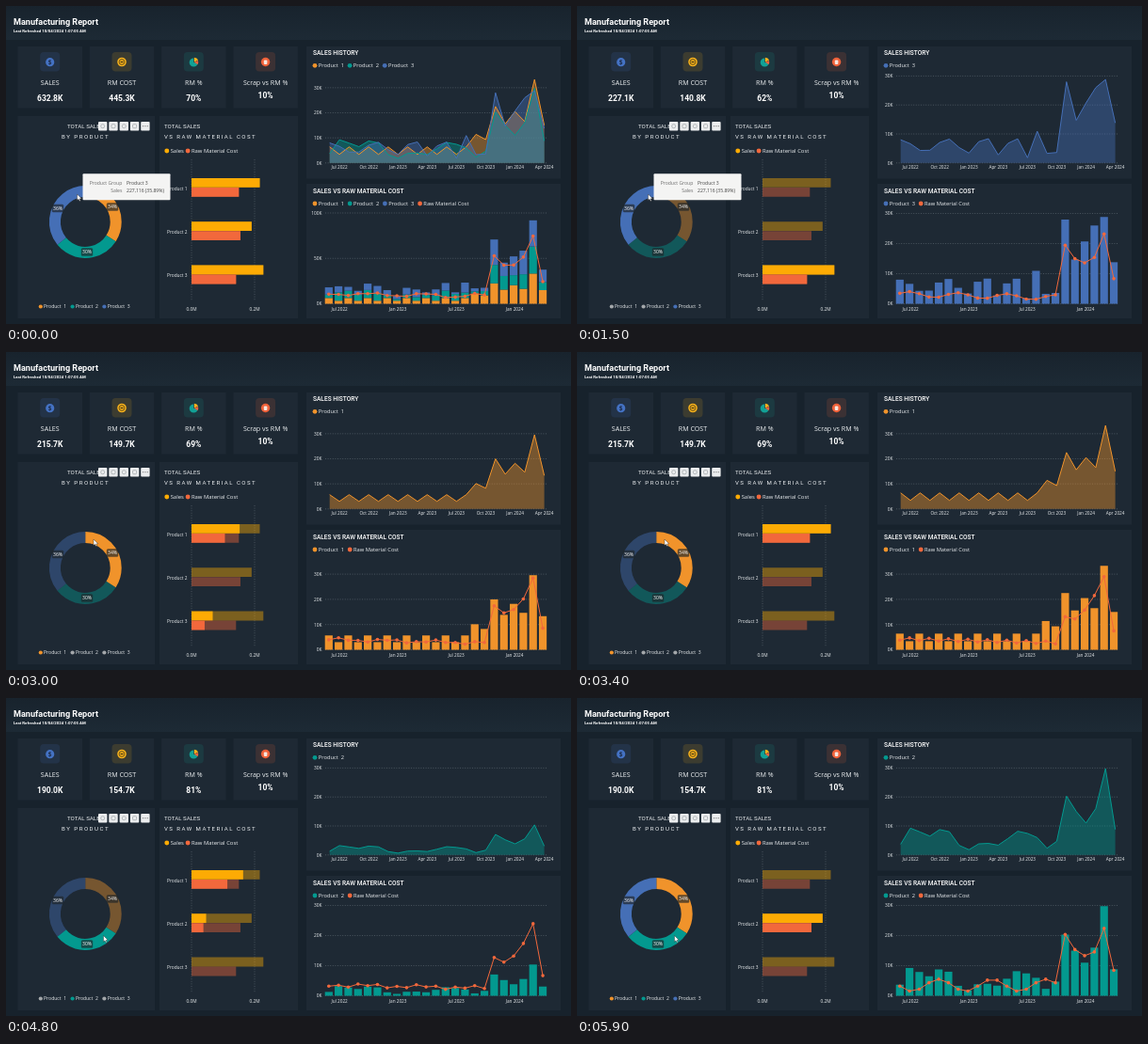
Write an HTML page with a canvas that moves like this. It is 600x338 px and loops after 6 s.

```html
<!DOCTYPE html>
<html lang="en">
<head>
<meta charset="utf-8">
<title>Manufacturing Report</title>
<style>
html, body { margin: 0; width: 100%; height: 100%; overflow: hidden; background: #17222c; }
canvas { display: block; }
</style>
</head>
<body>
<canvas id="stage" width="600" height="338"></canvas>
<script>
const ctx = document.getElementById('stage').getContext('2d');
const LOOP = 6000, MONTH_COUNT = 23;
const SANS = '"Open Sans", sans-serif', DIN = 'Roboto, sans-serif';
const YELLOW = '#fdab04', RED = '#f2683c', GREY = '#a3a7aa', LIGHT = '#eceff1', PANEL = '#1e2934';
const MONTHS = ['Jul 2022', 'Oct 2022', 'Jan 2023', 'Apr 2023', 'Jul 2023', 'Oct 2023', 'Jan 2024', 'Apr 2024'];

const wave = turns => Math.cos(turns * 2 * Math.PI);
const mix = (a, b, p) => a + (b - a) * p;
const ease = p => { p = Math.min(1, Math.max(0, p)); return p * p * (3 - 2 * p); };

// Monthly values in thousands: a wavy quiet period, then a late surge
function series(quiet, surge) {
  const start = MONTH_COUNT - surge.length;
  return Array.from({ length: MONTH_COUNT }, (_, i) => i < start ? Math.max(.3, quiet(i)) : surge[i - start]);
}
const costSurge = lean => [17.7, 14.2, 14.2, 17.1, 24.8, 8.1].map((v, j) => v * (1 - lean * Math.cos(j)));

const PRODUCTS = [
  {
    color: '#f0932b', totals: [215.7, 149.7],
    sales: series(i => 4.9 + 1.5 * wave(i / 2), [11.4, 9.3, 22.5, 15.6, 20.5, 16.5, 33.3, 15]),
    cost: series(i => 4.3 - .09 * i - .5 * wave(i / 2), costSurge(.26))
  },
  {
    color: '#03998f', totals: [190, 154.7],
    sales: series(i => 5.3 + 4 * Math.exp(-i / 20) * wave((i - 3) / 10) + 3 * Math.exp(-i / 12) * wave((i - 1) / 3.7),
      [2.3, 4.7, 20.3, 15, 11, 16, 29.8, 8.8]),
    cost: series(i => 3.5 + 2 * wave((i - 4) / 5.5), costSurge(-.15))
  },
  {
    color: '#456fb6', totals: [227.1, 140.8],
    sales: series(i => 6 + (2 + .015 * i * i) * wave(i / 5 + 1.2 * (i / 14) ** 3),
      [3.3, 3.6, 28, 14.7, 20.7, 26, 28.8, 13.8]),
    cost: series(i => 3.2 - .07 * i + .9 * wave((i - 1) / 5), costSurge(-.1))
  }
];
PRODUCTS.forEach((product, i) => product.name = 'Product  ' + (i + 1));

// What each selection shows; scales are pixels per thousand
const ALL = { shown: PRODUCTS, kpi: ['632.8K', '445.3K', '70%', '10%'], area: 2.665, col: .965, ticks: [0, 50, 100] };
const TENS = [0, 10, 20, 30];
const [VIEW1, VIEW2, VIEW3] = [
  { kpi: ['215.7K', '149.7K', '69%', '10%'], area: 2.665, col: 2.68 },
  { kpi: ['190.0K', '154.7K', '81%', '10%'], area: 3.08, col: 3.2 },
  { kpi: ['227.1K', '140.8K', '62%', '10%'], area: 3.08, col: 3.2 }
].map((view, i) => ({ ...view, shown: [PRODUCTS[i]], ticks: TENS }));
const CLICKS = [[-9999, ALL], [200, VIEW3], [2600, VIEW1], [4550, VIEW2], [5850, ALL]];
const REPORT_DELAY = 100;
const CURSOR = [[0, 75.5, 200], [1500, 75.5, 200], [2200, 93, 199], [3600, 93, 199], [4400, 103.5, 252.5], [LOOP, 103.5, 252.5]];

const has = (view, product) => view.shown.includes(product);

function rect(x, y, w, h, color, radius = 0) {
  ctx.fillStyle = color;
  ctx.beginPath();
  ctx.roundRect(x, y, w, h, radius);
  ctx.fill();
}
function dot(x, y, r, color) {
  ctx.fillStyle = color;
  ctx.beginPath();
  ctx.arc(x, y, r, 0, 7);
  ctx.fill();
}
function slice(x, y, r, from, to, color) {
  ctx.fillStyle = color;
  ctx.beginPath();
  ctx.moveTo(x, y);
  ctx.arc(x, y, r, from, to);
  ctx.fill();
}
function text(str, x, y, size, { align = 'left', color = LIGHT, font = SANS, weight = 400, gap = 0 } = {}) {
  ctx.font = `${weight} ${size}px ${font}`;
  ctx.textAlign = align;
  ctx.letterSpacing = gap + 'px';
  ctx.fillStyle = color;
  ctx.fillText(str, x, y);
}
function path(points) {
  ctx.beginPath();
  points.forEach(([x, y]) => ctx.lineTo(x, y));
}
function stroke(color, width) {
  ctx.strokeStyle = color;
  ctx.lineWidth = width;
  ctx.stroke();
}
function gridLine(x1, y1, x2, y2) {
  ctx.setLineDash([1, 1.6]);
  path([[x1, y1], [x2, y2]]);
  stroke('#66717a', .6);
  ctx.setLineDash([]);
}
function faded(alpha, draw) {
  ctx.globalAlpha = alpha;
  draw();
  ctx.globalAlpha = 1;
}
function legend(items, x, y, pitch, size) {
  items.forEach(([name, color], i) => {
    dot(x + i * pitch, y, size * .42, color);
    text(name, x + i * pitch + size * .65, y + size * .36, size);
  });
}
const productItems = view => view.shown.map(({ name, color }) => [name, color]);

function drawFrame() {
  const header = ctx.createLinearGradient(0, 0, 0, 36);
  header.addColorStop(0, '#18232d');
  header.addColorStop(1, '#1d2a35');
  rect(0, 0, 600, 338, '#17222c');
  rect(0, 0, 600, 36, header);
  text('Manufacturing Report', 8, 19.8, 9.1, { font: DIN, weight: 700, color: '#fff' });
  text('Last Refreshed 10/04/2024 1:07:05 AM', 8, 28.3, 4.3, { font: DIN, weight: 700, color: '#fff' });
  [[12.5, 117, 145.5, 215], [163, 117, 147, 215], [319, 43, 270, 140.5], [319, 189, 270, 143]]
    .forEach(box => rect(...box, PANEL));
}

const CARDS = [
  ['SALES', '#4472c4', x => {
    dot(x, 59.7, 4.6, '#4472c4');
    text('$', x, 62.2, 6.5, { align: 'center', weight: 700, color: '#1b2b49' });
  }],
  ['RM COST', '#f7b21c', x => {
    dot(x, 59.5, 4.8, '#f7b21c');
    ctx.beginPath();
    ctx.arc(x, 59.5, 2.9, 0, 7);
    stroke('#4a3a14', .8);
    rect(x - 1.5, 58.8, 3, 1.4, '#4a3a14');
  }],
  ['RM %', '#12a196', x => {
    slice(x, 60, 4.6, 0, 4.71, '#12a196');
    slice(x + .6, 59.4, 4.6, -1.57, -.4, '#f7b21c');
    slice(x + .6, 59.7, 4.4, -.4, .6, '#e8623c');
  }],
  ['Scrap vs RM %', '#f0623a', x => {
    dot(x, 59.5, 4.7, '#f0623a');
    rect(x - 1.8, 57.5, 3.6, 4.4, '#f6e6df', 1);
  }]
];
function drawCards(view) {
  CARDS.forEach(([label, color, icon], i) => {
    const left = 12.5 + i * 76.3, x = left + 34.2;
    rect(left, 43, 68.5, 65.5, PANEL);
    faded(.14, () => rect(x - 10.5, 49, 21, 20.5, color, 4));
    icon(x);
    text(label, x, 83.7, 7.1, { align: 'center' });
    text(view.kpi[i], x, i < 3 ? 100.6 : 98, 8.5, { align: 'center', font: DIN, weight: 700, color: '#fff' });
  });
}

function drawDonut(view) {
  text('TOTAL SALES', 65, 130, 6.2, { font: DIN });
  text('BY PRODUCT', 59, 141, 6.1, { font: DIN, gap: 1.5 });
  for (let i = 0; i < 5; i++) {
    const x = 98 + i * 11.3;
    rect(x, 123, 9.4, 9.4, '#eceeef', 1);
    if (i === 4) [2.4, 4.7, 7].forEach(d => dot(x + d, 127.7, .6, '#777'));
    else {
      ctx.beginPath();
      ctx.roundRect(x + 2.7, 125.7, 4, 4, i % 2 ? 1 : 2);
      stroke('#9a9fa3', .7);
    }
  }
  const total = PRODUCTS.reduce((sum, p) => sum + p.totals[0], 0);
  let angle = -Math.PI / 2;
  PRODUCTS.forEach(p => {
    const end = angle + p.totals[0] / total * Math.PI * 2;
    faded(has(view, p) ? 1 : .42, () => {
      ctx.beginPath();
      ctx.arc(84.3, 229.5, 32.4, angle, end);
      stroke(p.color, 12);
    });
    angle = end;
  });
  [['34%', 113, 213.5], ['30%', 86, 261.5], ['36%', 55, 215]].forEach(([label, x, y]) => {
    rect(x - 6.2, y - 4.3, 12.4, 8.6, 'rgba(32,38,42,.68)', 1.5);
    text(label, x, y + 1.9, 5.1, { align: 'center', color: '#fff' });
  });
  legend(PRODUCTS.map(p => [p.name, has(view, p) ? p.color : GREY]), 36.8, 319.5, 33.8, 5.05);
}

function drawBars(from, to, progress) {
  text('TOTAL SALES', 168, 130, 6.15, { font: DIN });
  text('VS RAW MATERIAL COST', 168, 141, 6.1, { font: DIN, gap: 1.45 });
  legend([['Sales', YELLOW], ['Raw Material Cost', RED]], 170.8, 154, 22.3, 5.9);
  [[197, '0.0M'], [264, '0.2M']].forEach(([x, label]) => {
    gridLine(x, 163, x, 313);
    text(label, x, 323.7, 4.8, { align: 'center' });
  });
  PRODUCTS.forEach((p, i) => {
    const y = 183 + i * 46.3;
    const lit = mix(+has(from, p), +has(to, p), progress);
    text('Product ' + (i + 1), 192.5, y + 12.7, 4.8, { align: 'right' });
    p.totals.forEach((value, k) => {
      const width = value * .336, color = k ? RED : YELLOW;
      faded(.42, () => rect(197, y + k * 10, width, 9.8, color));
      rect(197, y + k * 10, width * lit, 9.8, color);
    });
  });
}

function axis(base, scale, ticks) {
  ticks.forEach(v => {
    const y = base - v * scale;
    gridLine(339, y, 574, y);
    text(v + 'K', 335.5, y + 1.8, 4.8, { align: 'right' });
  });
}

function drawHistory(from, to, progress) {
  const base = 166.8, xAt = i => 343.7 + i * 10.36;
  text('SALES HISTORY', 326, 52.3, 6.6, { font: DIN, weight: 500, color: '#fff' });
  legend(productItems(to), 328, 63.3, 37.1, 5.75);
  axis(base, to.area, TENS);
  MONTHS.forEach((m, i) => text(m, xAt(1 + i * 3), 172.8, 4.7, { align: 'center' }));
  const areas = to.shown.map(p => {
    const scale = mix(has(from, p) ? from.area : 0, to.area, progress);
    return [p.color, p.sales.map((v, i) => [xAt(i), base - v * scale])];
  });
  areas.forEach(([color, points]) => {
    path([[xAt(0), base], ...points, [xAt(MONTH_COUNT - 1), base]]);
    ctx.fillStyle = color;
    faded(.42, () => ctx.fill());
  });
  areas.forEach(([color, points]) => {
    path(points);
    stroke(color, 1);
  });
}

function drawColumns(from, to, barProgress, lineProgress) {
  const base = 316.5, xAt = i => 342.8 + i * 10.33;
  text('SALES VS RAW MATERIAL COST', 326, 198.5, 6.55, { font: DIN, weight: 500, color: '#fff' });
  legend([...productItems(to), ['Raw Material Cost', RED]], 328, 210, 37.2, 5.75);
  axis(base, to.col, to.ticks);
  [0, 2, 4, 6].forEach(i => text(MONTHS[i], xAt(1 + i * 3) + 1, 323.6, 4.7, { align: 'center' }));
  const lineHeight = (view, i) => view.shown.reduce((sum, p) => sum + p.cost[i], 0) * view.col;
  const line = [];
  for (let i = 0; i < MONTH_COUNT; i++) {
    let y = base;
    to.shown.forEach(p => {
      const h = p.sales[i] * mix(has(from, p) ? from.col : 0, to.col, barProgress);
      y -= h;
      rect(xAt(i) - 4.1, y, 8.2, h, p.color);
    });
    line.push([xAt(i), base - mix(lineHeight(from, i), lineHeight(to, i), lineProgress)]);
  }
  path(line);
  stroke(RED, 1);
  line.forEach(([x, y]) => dot(x, y, 1.8, RED));
}

function drawTooltip() {
  rect(81.5, 178.3, 93, 28, '#f4f4f3', 1);
  [['Product Group', 'Product 3'], ['Sales', '227,116 (35.89%)']].forEach(([key, value], i) => {
    const y = 190.4 + i * 8;
    text(key, 123.3, y, 5.05, { align: 'right', color: '#6b6b6b' });
    text(value, 128, y, 5.05, { color: '#444' });
  });
}

function drawCursor(t) {
  const k = CURSOR.findIndex(([end]) => end > t);
  const [t0, x0, y0] = CURSOR[k - 1], [t1, x1, y1] = CURSOR[k];
  const p = ease((t - t0) / (t1 - t0)), x = mix(x0, x1, p), y = mix(y0, y1, p);
  path([[0, 0], [0, 6.6], [1.5, 5.3], [2.6, 7.6], [3.6, 7.1], [2.6, 4.9], [4.7, 4.7]].map(([dx, dy]) => [x + dx, y + dy]));
  ctx.closePath();
  ctx.fillStyle = '#fff';
  ctx.fill();
  stroke('#222', .4);
}

function render(t) {
  const latest = time => CLICKS.findLastIndex(([at]) => at <= time);
  const k = latest(t - REPORT_DELAY);
  const [start, to] = CLICKS[k], from = CLICKS[Math.max(0, k - 1)][1];
  const progress = duration => ease((t - start - REPORT_DELAY) / duration);
  drawFrame();
  drawCards(to);
  drawDonut(CLICKS[latest(t)][1]);
  drawBars(from, to, progress(470));
  drawHistory(from, to, progress(380));
  drawColumns(from, to, progress(380), progress(550));
  const tip = 1 - ease((t - 1550) / 200);
  if (tip > 0) faded(tip, drawTooltip);
  drawCursor(t);
}

function tick() {
  // Stop short of the last report refresh: the loop cuts straight back to the full view
  render(Math.min(performance.now() % LOOP, LOOP - 51));
  requestAnimationFrame(tick);
}
tick();
</script>
</body>
</html>
```
